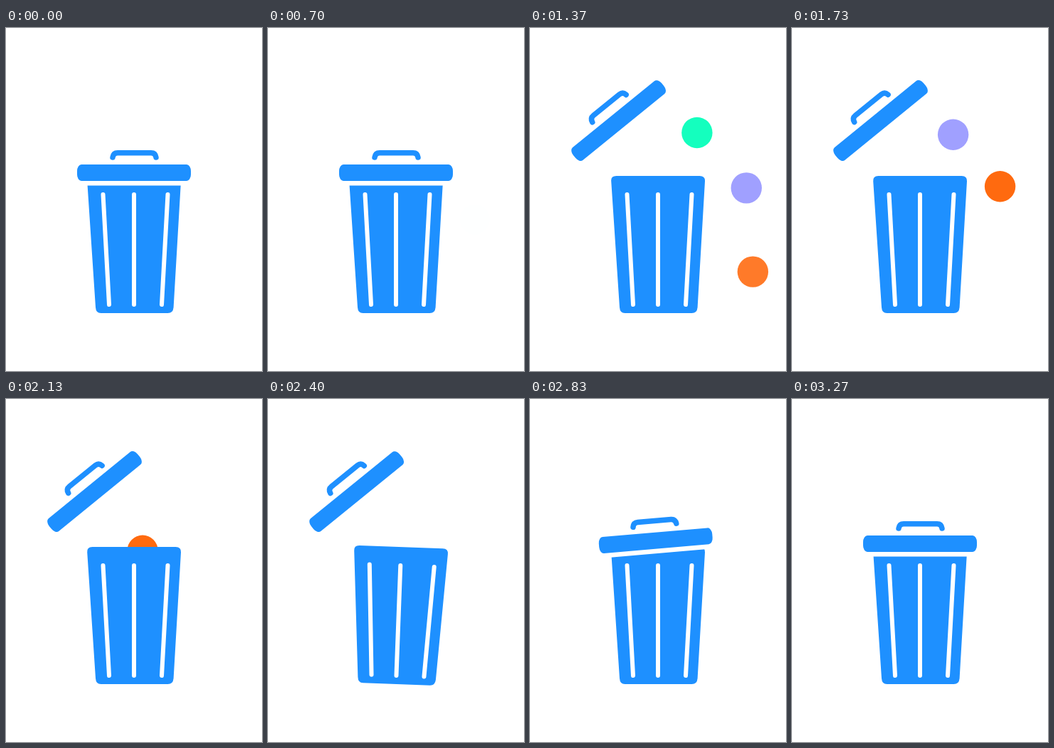
An HTML page for the animation above (4.51 s loop, 360 by 480 pixels).

```html
<!DOCTYPE html>
<html lang="en">
<head>
<meta charset="utf-8">
<title>Bin</title>
<style>
  html, body { margin: 0; width: 100%; height: 100%; overflow: hidden; background: #fff; }
  svg { display: block; width: 100vw; height: 100vh; }
</style>
</head>
<body>
<svg viewBox="0 0 360 480">
  <g id="balls"></g>
  <g id="bin">
    <path fill="#1e90ff" d="M121.5 207H238.5Q246.500 207 246 214.500L235.600 391Q235 399 227.500 399H133.500Q126.500 399 126 391L114.200 214.500Q113.500 207 121.500 207Z"/>
    <path stroke="#fff" stroke-width="6" stroke-linecap="round" d="M136.500 233L145 387M180 233V387M227.500 233L219 387"/>
  </g>
  <g id="lid">
    <rect x="-80" y="-11.5" width="160" height="23" rx="6" ry="9" fill="#1e90ff" stroke="#fff" stroke-width="13" paint-order="stroke"/>
    <path fill="none" stroke="#1e90ff" stroke-width="7.5" stroke-linecap="round" d="M-30 -21.500Q-29 -27.800 -23 -27.800H24Q30 -27.800 31 -21.500"/>
  </g>
</svg>
<script>
const LOOP = 4510;
const FLIGHT = 970;
const FADE = 360;
const bin = document.getElementById('bin');
const lid = document.getElementById('lid');

// Every ball rises from its own spot and shares the rest of the arc into the bin.
const rise = { x: 321, y: 186 };
const crest = { x: 200, y: 44 };
const drop = { x: 186, y: 262 };
const balls = [
  { color: '#14ffbe', from: { x: 290, y: 270 }, show: 700, launch: 610 },
  { color: '#a0a0ff', from: { x: 313, y: 285 }, show: 760, launch: 938 },
  { color: '#ff6a0f', from: { x: 313, y: 356 }, show: 1050, launch: 1205 }
];

for (const ball of balls) {
  ball.node = document.createElementNS('http://www.w3.org/2000/svg', 'circle');
  ball.node.setAttribute('r', 21.7);
  ball.node.setAttribute('fill', ball.color);
  document.getElementById('balls').append(ball.node);
}

const span = (t, from, to) => Math.min(1, Math.max(0, (t - from) / (to - from)));
const sineInOut = u => (1 - Math.cos(Math.PI * u)) / 2;
const quadIn = u => u * u;

function bezier(a, b, c, d, s) {
  const r = 1 - s;
  return r * r * r * a + 3 * r * r * s * b + 3 * r * s * s * c + s * s * s * d;
}

function drawBall({ node, from, show, launch }, t) {
  const s = quadIn(span(t, launch, launch + FLIGHT));
  for (const axis of ['x', 'y']) {
    node.setAttribute('c' + axis, bezier(from[axis], rise[axis], crest[axis], drop[axis], s));
  }
  node.setAttribute('opacity', s < 1 ? span(t, show, show + FADE) : 0);
}

function draw(t) {
  for (const ball of balls) drawBall(ball, t);

  // The lift lags a little behind the turn of the lid.
  const open = sineInOut(span(t, 955, 1380)) * (1 - sineInOut(span(t, 2386, 2965)));
  const lift = Math.pow(open, 1.37);
  lid.setAttribute('transform',
    `translate(${180 - 55.5 * lift} ${202.5 - 73 * lift}) rotate(${-39 * open})`);

  const shake = 3.2 * Math.sin(2 * Math.PI * span(t, 2290, 2580));
  bin.setAttribute('transform', `rotate(${shake} 180 400)`);
}

function tick() {
  draw(performance.now() % LOOP);
  requestAnimationFrame(tick);
}
tick();
</script>
</body>
</html>
```
